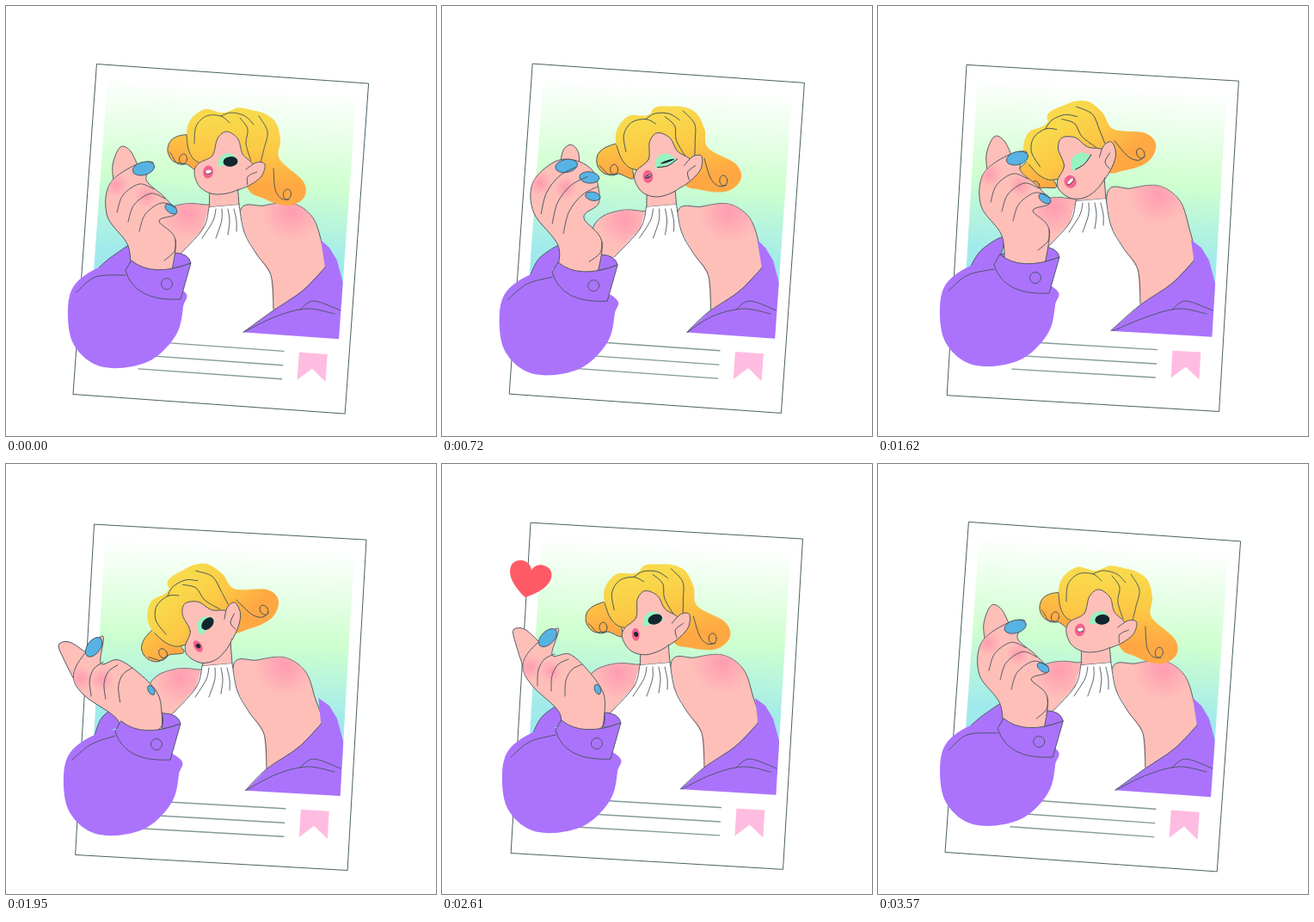
An HTML page with a canvas that plays this animation: 500 by 500 pixels, repeating every 3.6 s.

```html
<!DOCTYPE html>
<html lang="en">
<head>
<meta charset="utf-8">
<title>Finger heart</title>
<style>
html, body { margin: 0; width: 100%; height: 100%; overflow: hidden; background: #fff; }
canvas { display: block; }
</style>
</head>
<body>
<canvas id="stage" width="500" height="500"></canvas>
<script>
const ctx = document.getElementById('stage').getContext('2d');
const LOOP = 3600, STEP = 30, TANGENT = 0.7;
const SKIN = '#ffbfb9', BLUSH = '#ff9cb0', PURPLE = '#ab73fc', INK = '#46525a';
const DARK = '#12262f', MINT = '#98f3c2', NAIL = '#57b3e4';

// head: x, y, tilt, hair lag        look: eye opening, mouth width, mouth height, teeth
// torso: dx, dy, right lift, left drop, jacket tip     sleeve: dx, dy, cuff dx, cuff dy
// hand: wave weight, heart weight, dx, dy, tilt
const KEYS = [
  { at: 0, head: [250, 185, 0, 0], look: [1, 4, 2.5, 1], torso: [0, 0, 0, 0, 0], sleeve: [0, 0, 0, 0], hand: [0, 0, 0, 0, 0] },
  { at: 360, head: [253, 187, -6, 4], look: [0, 4.5, 2.5, 0.8], torso: [2, 2, 2, 7, 8], sleeve: [-4, 7, -8, 3], hand: [0.5, 0, 0, 0, 8] },
  { at: 1050, head: [249, 187, -20, 10], look: [0.5, 3.5, 1, 0], torso: [0, -3, -2, 5, 7], sleeve: [-5, 7, -11, 0], hand: [1, 0, 0, 0, 0] },
  { at: 1620, head: [231, 189, -36, 8], look: [0, 5, 2, 1], torso: [-6, -7, -20, -7, -7], sleeve: [0, -2, -4, -7], hand: [0, 0, 2, -12, 0] },
  { at: 1950, head: [229, 196, -42, 9], look: [1, 2.5, 3, 0], torso: [-8, 1, -4, 8, 3], sleeve: [-5, 11, -12, 3], hand: [0, 1, -6, 3, -9] },
  { at: 2610, head: [238, 187, -13, 6], look: [1, 2.5, 3, 0], torso: [-6, 0, -7, 2, 0], sleeve: [-2, 8, -7, 2], hand: [0, 1, 0, 0, 0] },
];

const pairs = v => Array.from({ length: v.length / 2 }, (_, i) => [v[2 * i], v[2 * i + 1]]);
const numbers = text => text.split(' ').map(Number);
const points = text => pairs(numbers(text));

const HEAD = {
  left: points('222 154 206 150 192 156 188 169 195 181 210 184 226 192'),
  right: points('262 126 290 122 312 133 319 155 318 178 345 203 347 222 328 232 300 224 278 206'),
  cap: points('224 183 211 160 213 135 231 120 252 124 272 119 296 127 306 155 288 186'),
  face: points('240 174 246 154 257 146 270 155 275 172 288 188 272 212 245 219 226 211 219 194 224 183'),
  ear: points('279 190 291 182 301 184 297 198 284 208 270 214'),
  strands: ['210 150 212 166 218 178 228 184', '219 160 221 140 233 128 250 128 260 136',
    '250 128 262 124 278 128 288 138', '272 130 281 143 279 160 285 180', '294 128 304 146 300 166 296 182'].map(points),
};
const ARM = points('272 240 300 232 332 229 356 245 367 275 371 304 345 331 308 356');
const SHIRT = points('199 292 229 259 236 234 271 231 277 263 291 288 308 313 311 353 311 420 160 420 170 310');
const SLEEVE = points('139 300 108 304 80 324 72 352 77 390 100 415 132 421 170 411 198 382 206 350 205 330');

// Three gestures of one hand: outline, rear finger, first crease and its step, nails (x, y, radius, tilt).
const GESTURES = [
  { outline: '145 318 142 279 118 245 120 208 148 186 171 182 163 202 184 222 198 241 178 250 197 272 190 322',
    rear: '126 210 124 185 133 164 145 169 155 190', crease: '129 240 136 220 155 207 172 213', step: '13 11',
    nails: '160 189 13 -15 192 236 8 35 190 240 0 10' },
  { outline: '131 318 133 282 100 245 95 210 118 183 143 180 168 190 175 215 172 228 158 245 182 272 178 322',
    rear: '128 190 131 168 140 162 149 172 150 195', crease: '108 246 112 220 125 198 143 184', step: '14 10',
    nails: '132 187 13 -15 159 193 12 -5 166 217 10 6' },
  { outline: '134 318 137 290 105 258 94 236 104 215 135 191 128 222 148 221 168 238 187 265 189 290 184 322',
    rear: '95 238 86 210 83 193 96 192 112 206', crease: '111 258 112 240 119 227 131 221', step: '16 6',
    nails: '123 202 13 -45 165 240 0 60 181 262 6 70' },
].map(g => Object.fromEntries(Object.entries(g).map(([name, text]) => [name, numbers(text)])));

const clamp = (v, lo, hi) => Math.min(hi, Math.max(lo, v));
const rad = degrees => degrees * Math.PI / 180;
const shift = ([x, y], dx, dy) => [x + dx, y + dy];
const shiftAll = (list, dx, dy) => list.map(p => shift(p, dx, dy));
const mix = (a, b, u) => [a[0] + (b[0] - a[0]) * u, a[1] + (b[1] - a[1]) * u];
const keyAt = k => KEYS[(k + KEYS.length) % KEYS.length];
const keyTime = k => keyAt(k).at + LOOP * Math.floor(k / KEYS.length);

// Cubic Hermite blend through the key poses, wrapping at the loop end.
function poseAt(t) {
  const k = KEYS.findLastIndex(key => key.at <= t);
  const [before, span, after] = [-1, 0, 1].map(j => keyTime(k + j + 1) - keyTime(k + j));
  const u = (t - keyTime(k)) / span;
  const blend = (a, b, c, d) => {
    const s0 = (b - a) / before, s1 = (c - b) / span, s2 = (d - c) / after;
    const m0 = TANGENT * span * (s0 * span + s1 * before) / (before + span);
    const m1 = TANGENT * span * (s1 * after + s2 * span) / (span + after);
    return b + (c - b) * u * u * (3 - 2 * u) + m0 * u * (1 - u) ** 2 - m1 * u * u * (1 - u);
  };
  const pose = {};
  for (const part of ['head', 'look', 'torso', 'sleeve', 'hand']) {
    const [a, b, c, d] = [-1, 0, 1, 2].map(j => keyAt(k + j)[part]);
    pose[part] = b.map((v, i) => blend(a[i], v, c[i], d[i]));
  }
  return pose;
}

function paint(fill, line) {
  if (fill) { ctx.fillStyle = fill; ctx.fill(); }
  if (line) { ctx.strokeStyle = line; ctx.stroke(); }
}

function spline(list, closed, fill, line) {
  const n = list.length;
  const at = i => list[closed ? (i + n) % n : clamp(i, 0, n - 1)];
  ctx.beginPath();
  ctx.moveTo(...at(0));
  for (let i = 0; i < (closed ? n : n - 1); i++) {
    const [a, b, c, d] = [-1, 0, 1, 2].map(j => at(i + j));
    ctx.bezierCurveTo(b[0] + (c[0] - a[0]) / 6, b[1] + (c[1] - a[1]) / 6,
      c[0] - (d[0] - b[0]) / 6, c[1] - (d[1] - b[1]) / 6, ...c);
  }
  paint(fill, line);
}

function polygon(list, fill, line) {
  ctx.beginPath();
  list.forEach(p => ctx.lineTo(...p));
  ctx.closePath();
  paint(fill, line);
}

function ellipse(x, y, rx, ry, tilt, fill, line) {
  if (rx < 0.3 || ry < 0.3) return;
  ctx.beginPath();
  ctx.ellipse(x, y, rx, ry, rad(tilt), 0, 7);
  paint(fill, line);
}

const stroke = list => spline(list, false, null, INK);

function glow([x, y], r) {
  const g = ctx.createRadialGradient(x, y, 0, x, y, r);
  g.addColorStop(0, BLUSH);
  g.addColorStop(1, BLUSH + '00');
  return g;
}

function gradient(y0, y1, ...stops) {
  const g = ctx.createLinearGradient(0, y0, 0, y1);
  stops.forEach(stop => g.addColorStop(...stop));
  return g;
}

// Runs a drawing with the base point (px, py) moved to (x, y) and turned.
function placed(x, y, tilt, px, py, drawing) {
  ctx.save();
  ctx.translate(x, y);
  ctx.rotate(rad(tilt));
  ctx.translate(-px, -py);
  drawing();
  ctx.restore();
}

function drawCard() {
  ctx.strokeStyle = '#3c5552';
  ctx.strokeRect(-158.3, -192.5, 316.6, 385);
  ctx.fillStyle = gradient(-178, 107, [0, '#fff'], [0.39, '#ceffce'], [0.7, '#a0eaec'], [1, '#96e4f4']);
  ctx.fillRect(-145, -178, 290, 245);
  ctx.strokeStyle = '#829b98';
  ctx.lineWidth = 1.4;
  ctx.beginPath();
  for (const y of [125, 141.5, 157.5]) { ctx.moveTo(-85, y); ctx.lineTo(82, y); }
  ctx.stroke();
  ctx.lineWidth = 0.9;
  polygon([[100, 125], [133, 125], [133, 157], [116.5, 143], [100, 157]], '#ffbce1');
}

function drawTorso([dx, dy, lift, drop, tipX]) {
  const top = [208 + dx, 230 + drop];
  const shoulder = [[42, 6], [22, 1], [0, 0], [-24, 8], [-35, 26], [-28, 60], [20, 60]];
  spline(shiftAll(shoulder, ...top), true, SKIN, INK);
  paint(glow(shift(top, 3, 11), 32));

  // The raised shoulder pulls the upper arm more than the elbow.
  const arm = ARM.map(([x, y], i) => [x + dx * (i < 5 ? 1 : 0.6), y + lift * (i < 5 ? 1 : 0.4)]);
  spline([...arm, [285 + dx, 325 + dy]], true, SKIN, INK);
  paint(glow(shift(arm[2], 0, 10), 36));

  const shirt = shiftAll(SHIRT, dx, dy), [left, right] = shirt.slice(2, 4);
  polygon([left, right, shift(right, -2, -25), shift(left, 1, -18)], SKIN, INK);
  polygon(shirt, '#fff');
  stroke(shirt.slice(0, 3));
  stroke(shirt.slice(3, 8));
  for (const [x0, x1, y1] of [[244, 228, 270], [251, 244, 270], [258, 258, 266], [265, 268, 262]])
    stroke(shiftAll([[x0, 236], [(x0 * 2 + x1) / 3 + 2, 250], [x1, y1]], dx, dy));

  const tip = [275 + tipX, 380], edge = [arm[5], arm[6], arm[7], tip];
  polygon([...edge.reverse(), [366 + dx / 3, 272], [376, 281], [385, 296], [392, 322], [410, 420], [tip[0], 420]], PURPLE);
  stroke(edge);
  stroke([tip, [314, 361], [350, 352], [382, 358]]);
  stroke([[342, 353], [358, 343], [389, 354]]);
}

function drawCurl(x, y, tail) {
  ellipse(x, y, 4.5, 6, 10, null, INK);
  stroke([[x + 2, y + 6], [x - 7, y + 5], [x - 14, y - 6], [x - 16, y - tail]]);
}

function drawEye(open) {
  ctx.beginPath();
  ctx.ellipse(-2, 4, 13 - open, 14, 0, Math.PI, 0);
  paint(MINT);
  ellipse(1, 0, 8.5, 5.8 * open, 0, DARK);
  if (open < 0.7) spline([[-12, 3], [0, 5], [13, 2 - 6 * open]], false, null, DARK);
}

function drawHead([x, y, tilt, lag], [open, mouthX, mouthY, teeth]) {
  const inHead = (dx, drawing) => placed(x + dx, y, tilt, 250, 185, drawing);
  const hair = y0 => gradient(y0, y0 + 105, [0.1, '#f9d94c'], [0.45, '#fcc945'], [0.85, '#ffa843']);
  const { left, right, cap, face, ear, strands } = HEAD;
  inHead(-lag, () => {
    spline(left, true, hair(95), INK);
    spline(right, true, hair(120));
    drawCurl(206, 178, 8);
    drawCurl(327, 219, 30);
  });
  inHead(-lag / 3, () => {
    spline(cap, true, hair(120));
    strands.forEach(stroke);
  });
  inHead(0, () => {
    spline(face, true, SKIN, INK);
    spline(ear, false, SKIN, INK);
    stroke([mix(ear[2], ear[5], 0.3), mix(ear[0], ear[4], 0.45), mix(ear[3], ear[5], 0.6)]);
    placed(260, 181, -5, 0, 0, () => drawEye(clamp(open, 0, 1)));
    ellipse(235, 193, mouthX + 2, 7.5, 8, '#f4628f');
    ellipse(235.5, 193, mouthX, mouthY, -10, '#23262f');
    ellipse(235.5, 192.7, mouthX * 0.9, mouthY * 0.85 * clamp(teeth, 0, 1), -10, '#fff');
  });
}

function drawHand([wave, heart, dx, dy, tilt]) {
  const [open, waving, crossed] = GESTURES;
  const shape = name => open[name].map((v, i) => v + wave * (waving[name][i] - v) + heart * (crossed[name][i] - v));
  const outline = pairs(shape('outline')), crease = pairs(shape('crease')), [stepX, stepY] = shape('step');
  const nails = shape('nails');
  placed(165 + dx, 300 + dy, tilt, 165, 300, () => {
    spline(pairs(shape('rear')), false, SKIN, INK);
    spline(outline, false, SKIN, INK);
    paint(glow(shift(outline[3], 8, 0), 15));
    paint(glow(shift(crease[2], 8, 14), 14));
    for (let i = 0; i < nails.length; i += 4) {
      const [x, y, r, turn] = nails.slice(i, i + 4);
      ellipse(x, y, r, r * 0.58, turn, NAIL, INK);
    }
    for (let i = 0; i < 3; i++) stroke(shiftAll(crease, i * stepX, i * stepY));
    stroke([outline[10], shift(outline[10], -1, 13), shift(outline[10], -13, 24)]);
  });
}

function drawArm(p) {
  const [dx, dy, cuffX, cuffY] = p.sleeve, sleeve = shiftAll(SLEEVE, dx, dy);
  const onCuff = drawing => placed(cuffX, cuffY, 0, 0, 0, drawing);
  const hem = [139 + cuffX, 303 + cuffY];
  spline([sleeve[1], shift(hem, -14, -13), shift(hem, 11, -27), shift(hem, 6, 0)], false, PURPLE, INK);
  onCuff(() => {
    ctx.beginPath();
    ctx.moveTo(146, 296);
    ctx.quadraticCurveTo(210, 276, 215, 299);
    ctx.quadraticCurveTo(170, 316, 146, 296);
    paint(PURPLE, INK);
  });
  drawHand(p.hand);
  spline(sleeve, true, PURPLE);
  stroke([shift(sleeve[2], 2, 9), shift(sleeve[1], -4, 11), shift(hem, 0, 10)]);
  onCuff(() => {
    ctx.beginPath();
    ctx.moveTo(146, 296);
    ctx.quadraticCurveTo(170, 316, 215, 299);
    ctx.lineTo(203, 341);
    ctx.quadraticCurveTo(150, 344, 139, 308);
    ctx.closePath();
    paint(PURPLE, INK);
    ellipse(187, 323, 6.5, 6.5, 0, null, INK);
  });
}

function drawHeart(t) {
  if (t < 2070 || t > 3540) return;
  const size = clamp((t - 2070) / 350, 0, 1);
  ctx.globalAlpha = clamp((3540 - t) / 240, 0, 1);
  placed(101.5, 134.5 - (t - 2610) * 0.1, 13, 0, 0, () => {
    ctx.scale(size, size);
    ctx.beginPath();
    ctx.moveTo(0, 21);
    for (const side of [-1, 1]) {
      ctx.moveTo(0, 21);
      ctx.bezierCurveTo(side * 33, 2, side * 28, -20, side * 12, -20);
      ctx.bezierCurveTo(side * 5, -20, side, -15, 0, -11);
    }
    paint('#ff5b66');
  });
  ctx.globalAlpha = 1;
}

function draw(t) {
  const p = poseAt(t), turn = 2 * Math.PI / LOOP;
  const tilt = 3.7 + 0.45 * Math.cos(turn * (t - 300));
  const cy = 270.1 + 1.4 * Math.cos(2 * turn * (t - 300));
  ctx.clearRect(0, 0, 500, 500);
  ctx.lineWidth = 0.9;
  ctx.lineCap = ctx.lineJoin = 'round';
  ctx.save();
  ctx.translate(250, cy);
  ctx.rotate(rad(tilt));
  drawCard();
  ctx.beginPath();
  ctx.rect(-145, -178, 290, 284.5);
  ctx.clip();
  ctx.rotate(-rad(tilt));
  ctx.translate(-250, -cy);
  drawTorso(p.torso);
  drawHead(p.head, p.look);
  ctx.restore();
  drawArm(p);
  drawHeart(t);
}

const start = performance.now();
function tick() {
  draw(Math.floor((performance.now() - start) % LOOP / STEP) * STEP);
  requestAnimationFrame(tick);
}
tick();
</script>
</body>
</html>
```
